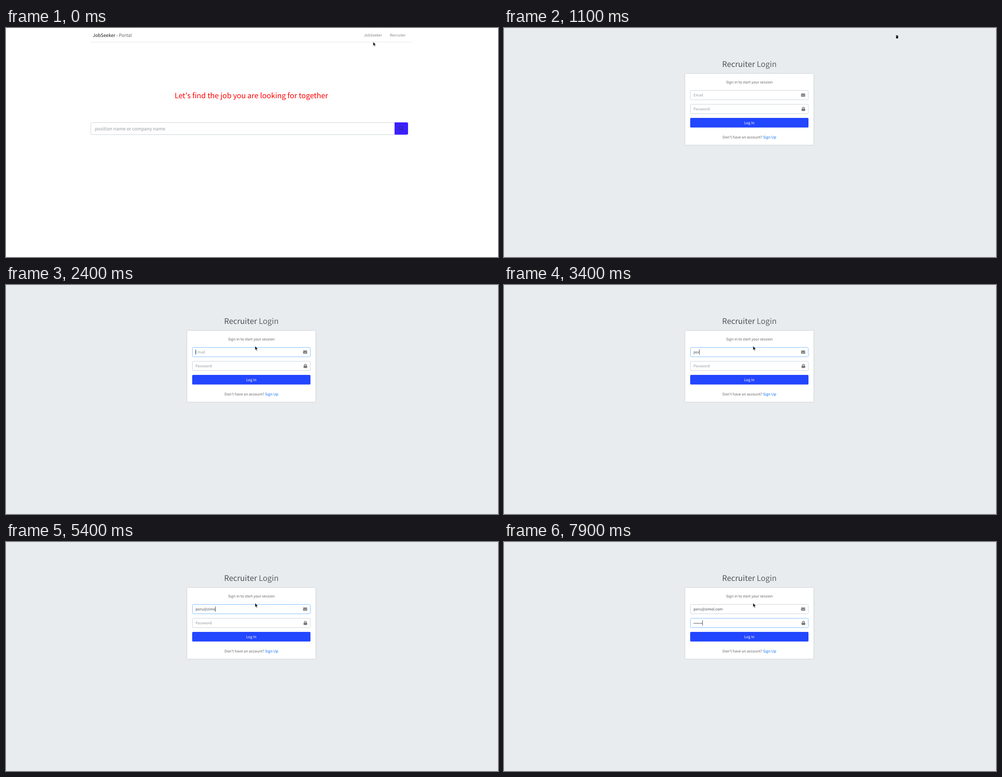
Animation of 1094x512 px, one loop 8000 ms. Source, as an HTML page:

```html
<!DOCTYPE html>
<html lang="en">
<head>
<meta charset="utf-8">
<title>Recruiter login</title>
<style>
  html, body { margin: 0; width: 100%; height: 100%; overflow: hidden; background: #fff; }
  svg { display: block; width: 100vw; height: 100vh; }
  text {
    font: 8.16px "Noto Sans CJK JP", "Noto Sans CJK SC", "Noto Sans CJK", "Noto Sans", sans-serif;
    text-rendering: geometricPrecision;
    fill: #666;
  }
  .mid { text-anchor: middle; }
  .hint { fill: #939ba2; }
  .typed { fill: #495057; }
  .large { font-size: 10.2px; }
  .field { fill: #fff; stroke: #ced4da; }
  .icon { fill: #777; }
  #login .card { filter: drop-shadow(0 .6px 1px rgba(0, 0, 0, .25)); }
</style>
</head>
<body>
<svg viewBox="0 0 1094 512" preserveAspectRatio="none">
  <g id="home">
    <rect width="1094" height="512" fill="#fff"/>
    <text class="large" x="192.7" y="20" style="fill:#1a1a1a">JobSeeker - <tspan fill="#6c6560">Portal</tspan></text>
    <text id="seekerLink" x="795.7" y="19">JobSeeker</text>
    <text id="recruiterLink" x="853.6" y="19">Recruiter</text>
    <rect x="188" y="31" width="715" height="1" fill="#e4e7ea"/>
    <text class="mid" x="545.6" y="157" style="font-size:16.38px;fill:#f00">Let's find the job you are looking for together</text>
    <rect class="field" x="188.5" y="211.5" width="677" height="27" rx="2.8"/>
    <text class="large hint" x="197.5" y="229.2">position name or company name</text>
    <path d="M864 211h27a3 3 0 0 1 3 3v21.5a3 3 0 0 1-3 3h-27z" fill="#3a20ff"/>
    <g fill="none" stroke="#30297f" stroke-width="1.4">
      <circle cx="877.8" cy="223.6" r="3.7"/>
      <path d="M880.5 226.3l3.2 3.2"/>
    </g>
  </g>

  <g id="login">
    <rect width="1094" height="512" fill="#e9ecef"/>
    <text class="mid" x="545.6" y="87" style="font-size:17.15px;fill:#495057">Recruiter <tspan font-weight="300" fill="#5b636a">Login</tspan></text>
    <rect class="card" x="402.8" y="102.3" width="285.6" height="159" rx="1" fill="#fff"/>
    <text class="mid" x="545.6" y="124.2">Sign in to start your session</text>

    <rect id="emailField" class="field" x="414.5" y="139.5" width="262" height="21" rx="2"/>
    <text id="emailHint" class="hint" x="421.3" y="153.3">Email</text>
    <text id="emailText" class="typed" x="421.3" y="153.3"></text>
    <rect class="icon" x="660.5" y="146.6" width="9.2" height="6.9" rx=".9"/>
    <path d="M660.5 148.3l3.7 2.7q.9.6 1.8 0l3.7-2.7" fill="none" stroke="#fff" stroke-width=".8"/>

    <rect id="passwordField" class="field" x="414.5" y="170.5" width="262" height="21" rx="2"/>
    <text id="passwordHint" class="hint" x="421.3" y="184.3">Password</text>
    <g id="bullets" class="typed"></g>
    <rect class="icon" x="661.7" y="180.6" width="8" height="5" rx=".8"/>
    <path d="M663.5 181v-1.6a2.2 2.2 0 0 1 4.4 0v1.6" fill="none" stroke="#777" stroke-width="1.5"/>

    <rect x="414" y="201" width="263" height="21.6" rx="2.2" fill="#2346ff"/>
    <text class="mid" x="545.5" y="215.3" style="fill:#fff">Log In</text>
    <text class="mid" x="545.6" y="247">Don't have an account? <tspan fill="#0b70f5">Sign Up</tspan></text>
    <rect id="caret" width="1" height="12" fill="#495057"/>
  </g>

  <g id="cursor">
    <path id="arrow" d="M0 0V8.8L2 7 3.5 10.3 5 9.6 3.5 6.5H6.3Z" fill="#111" stroke="#fff" stroke-width=".5"/>
    <path id="hand" d="M.2 .8Q.9 0 1.7.5L3.3 1.6Q5.2.6 6 2.2V6L5.2 8.6H1.8L.2 5.6Q0 4.6 1.4 4.5V2.5L.3 1.8Z" fill="#111" stroke="#fff" stroke-width=".5"/>
    <path id="beam" d="M-2.5-5H-.8L0-4.5.8-5H2.5M0-4.5V4.5M-2.5 5H-.8L0 4.5.8 5H2.5" fill="none" stroke="#111"/>
  </g>
</svg>

<script>
const LOOP = 8000, STEP = 100;
const LOGIN_AT = 1100, EMAIL_FOCUS = 2000, PASSWORD_FOCUS = 6400;
const EMAIL = 'poru@zimol.com';
const emailKeys = [3100, 3200, 3400, 3500, 4400, 5000, 5100, 5300, 5400, 5600, 5800, 5900, 6000, 6200];
const passwordKeys = [6600, 6900, 7000, 7300, 7400, 7700, 7900];
const caretResets = [EMAIL_FOCUS + STEP, ...emailKeys, PASSWORD_FOCUS, ...passwordKeys];
const TEXT_LEFT = 421.3, BULLET_PITCH = 2.83;

// Pointer path: time, x, y
const path = [
  [0, 816.3, 31], [100, 818, 27], [200, 822, 20], [300, 830, 16], [400, 842, 15],
  [500, 856, 14], [600, 866, 15], [700, 870.7, 15.2], [1200, 870.7, 15.2],
  [1300, 862, 22], [1400, 820, 55], [1500, 750, 100], [1600, 665, 142],
  [1700, 600, 166], [1800, 568, 172], [1900, 552, 163], [2000, 543, 150],
  [2100, 540, 146.5], [2300, 540, 146.5], [2400, 553.8, 136.6]
];

const $ = id => document.getElementById(id);
const show = (id, on) => { $(id).style.display = on ? '' : 'none'; };
const clamp = v => Math.min(1, Math.max(0, v));
const countUntil = (times, t) => times.filter(time => time <= t).length;
const within = (v, low, high) => v >= low && v <= high;

for (let i = 0; i < passwordKeys.length; i++) {
  const dot = document.createElementNS($('bullets').namespaceURI, 'circle');
  dot.setAttribute('cx', TEXT_LEFT + (i + .5) * BULLET_PITCH);
  dot.setAttribute('cy', 181.7);
  dot.setAttribute('r', 1);
  $('bullets').append(dot);
}

function pointerAt(t) {
  const next = path.findIndex(point => point[0] > t);
  if (next < 0) return path[path.length - 1].slice(1);
  const [t0, x0, y0] = path[next - 1], [t1, x1, y1] = path[next];
  const k = (t - t0) / (t1 - t0);
  return [x0 + (x1 - x0) * k, y0 + (y1 - y0) * k];
}

function drawPointer(t) {
  const [x, y] = pointerAt(t);
  const atLogin = t >= LOGIN_AT;
  const overSeeker = !atLogin && within(x, 788, 843) && y < 26;
  const overRecruiter = !atLogin && x > 846 && y < 26;
  const overField = atLogin && within(x, 414, 677) && (within(y, 139, 161) || within(y, 170, 192));
  const waiting = t === LOGIN_AT - STEP;
  const overLink = (overSeeker || overRecruiter) && !waiting;
  const shape = overField ? 'beam' : overLink || within(t, LOGIN_AT, 1200) ? 'hand' : 'arrow';
  for (const id of ['arrow', 'hand', 'beam']) show(id, id === shape);
  $('cursor').setAttribute('transform', `translate(${x} ${y})`);
  $('seekerLink').style.fill = overSeeker ? '#4d4d4d' : '#808080';
  $('recruiterLink').style.fill = overRecruiter ? '#4d4d4d' : '#808080';
}

function setFocus(id, amount) {
  const from = [206, 212, 218], to = [128, 189, 255];
  $(id).style.stroke = `rgb(${from.map((c, i) => Math.round(c + (to[i] - c) * amount))})`;
}

function drawForm(t) {
  const emailCount = countUntil(emailKeys, t), bulletCount = countUntil(passwordKeys, t);
  const fade = start => clamp((t - start + 60) / 150) * (t >= start);
  const inPassword = t >= PASSWORD_FOCUS;
  setFocus('emailField', fade(EMAIL_FOCUS) - fade(PASSWORD_FOCUS));
  setFocus('passwordField', fade(PASSWORD_FOCUS));

  $('emailText').textContent = EMAIL.slice(0, emailCount);
  show('emailHint', !emailCount);
  show('passwordHint', !bulletCount);
  [...$('bullets').children].forEach((dot, i) => { dot.style.display = i < bulletCount ? '' : 'none'; });

  const lastReset = caretResets[countUntil(caretResets, t) - 1];
  show('caret', t - lastReset < 600);
  const width = inPassword ? bulletCount * BULLET_PITCH : emailCount && $('emailText').getComputedTextLength();
  $('caret').setAttribute('x', Math.floor(TEXT_LEFT + width));
  $('caret').setAttribute('y', inPassword ? 175 : 144);
}

const start = performance.now();
function draw() {
  const elapsed = (performance.now() - start) % LOOP;
  const t = Math.floor(elapsed / STEP) * STEP;
  show('home', t < LOGIN_AT);
  show('login', t >= LOGIN_AT);
  drawPointer(t);
  drawForm(t);
  requestAnimationFrame(draw);
}
draw();
</script>
</body>
</html>
```
